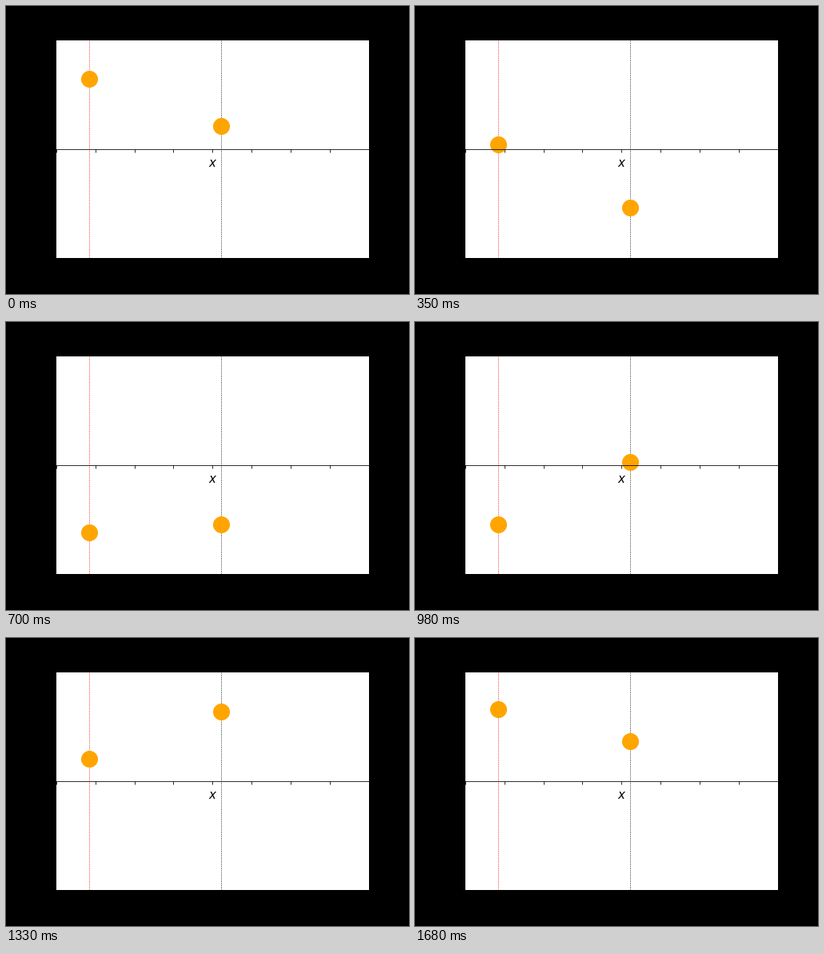
A matplotlib script for the animation above (1.75 s loop, 504 by 360 pixels).

```python
import numpy as np
import matplotlib.pyplot as plt
from matplotlib.animation import FuncAnimation

FRAMES = 25
INTERVAL = 70
OMEGA = 2 * np.pi / FRAMES

# (x position, phase, guide colour) of each oscillating ball
BALLS = [(0.84, 0.248, "red"), (4.22, 1.24, "black")]

fig = plt.figure(figsize=(7, 5), dpi=72, facecolor="black")
ax = fig.add_axes([0.125, 0.125, 0.775, 0.755], facecolor="white")
ax.set_xlim(0, 8)
ax.set_ylim(-1.5, 1.5)

# Horizontal axis through the middle, with bare ticks
for side in ("left", "right", "top"):
    ax.spines[side].set_visible(False)
ax.spines["bottom"].set_position("center")
ax.set_xticks(range(9))
ax.set_yticks([])
ax.tick_params(axis="x", labelbottom=False)
fig.text(258.3 / 504, 1 - 201.3 / 360, "x", fontsize=15, style="italic",
         family="DejaVu Sans", ha="center", va="baseline")

for x, _, color in BALLS:
    ax.axvline(x, color=color, linestyle="--", linewidth=0.5)

dots = [ax.plot([x], [np.cos(phase)], "o", color="orange", markersize=20)[0]
        for x, phase, _ in BALLS]


def update(frame):
    for dot, (_, phase, _) in zip(dots, BALLS):
        dot.set_ydata([np.cos(OMEGA * frame + phase)])
    return dots


anim = FuncAnimation(fig, update, frames=FRAMES, interval=INTERVAL,
                     repeat=True, repeat_delay=0, blit=False)
plt.show()
```
